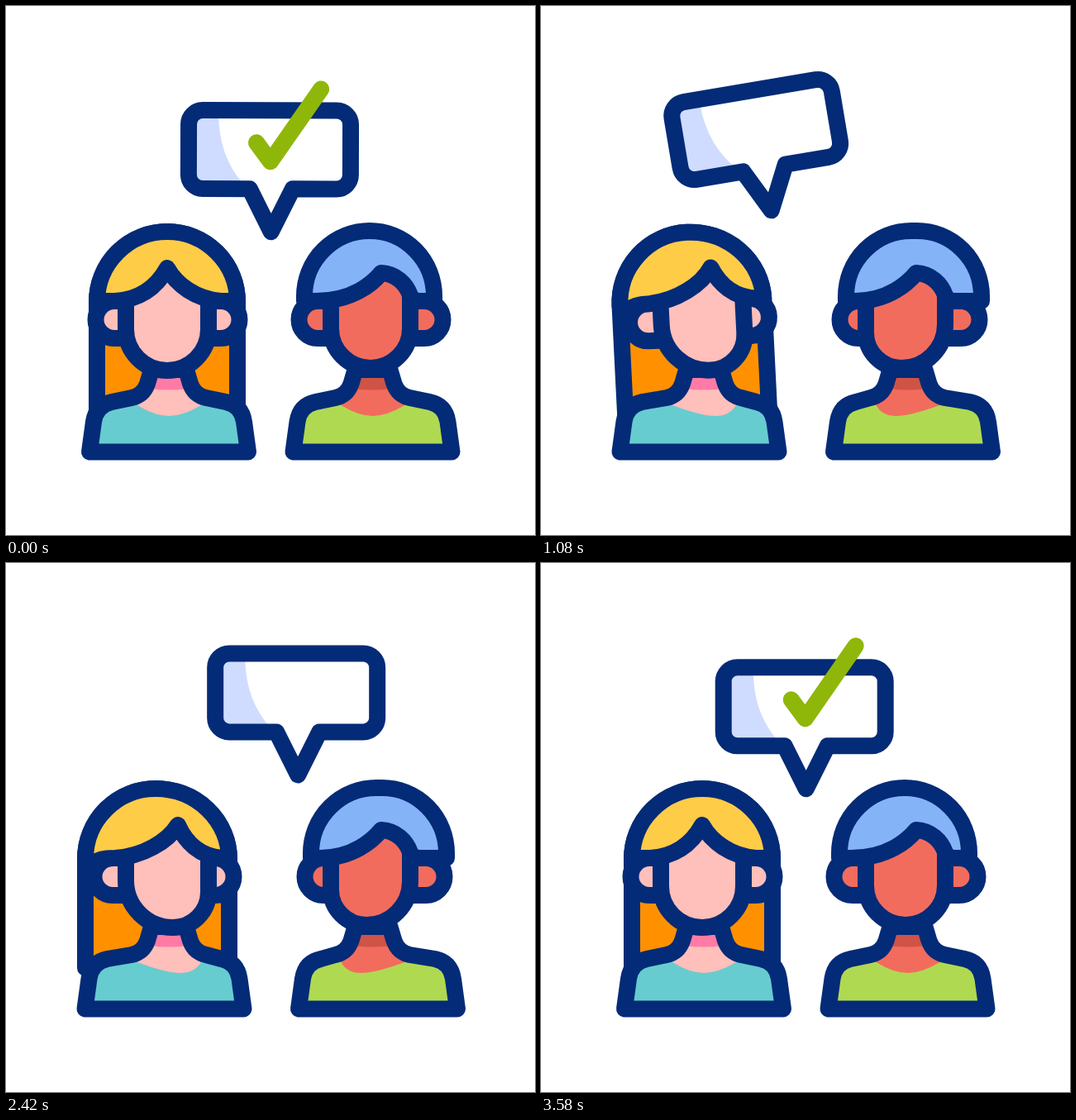
Write an HTML page with a canvas that moves like this. It is 640 by 640 pixels and loops after 3.6 s.

```html
<!DOCTYPE html>
<html lang="en">
<head>
<meta charset="utf-8">
<title>Two people agree</title>
<style>
  html, body { margin: 0; width: 100%; height: 100%; overflow: hidden; background: #fff; }
  canvas { display: block; width: 640px; height: 640px; }
</style>
</head>
<body>
<canvas id="stage" width="640" height="640"></canvas>
<script>
const ctx = document.getElementById('stage').getContext('2d');
const LOOP = 3600, NAVY = '#042b77';

// Eased progress from 0 to 1 between two times
const ease = (t, from, to) => {
  const x = Math.min(1, Math.max(0, (t - from) / (to - from)));
  return (1 - Math.cos(Math.PI * x)) / 2;
};

// Swing with a 400 ms period, active only between two times
const swing = (t, from, to) =>
  t > from && t < to ? Math.sin((t - from) / 400 * 2 * Math.PI) : 0;

function fill(d, color) {
  ctx.fillStyle = color;
  ctx.fill(new Path2D(d));
}

function stroke(d, color = NAVY) {
  ctx.strokeStyle = color;
  ctx.stroke(new Path2D(d));
}

function shape(d, color) {
  fill(d, color);
  stroke(d);
}

function rotated(x, y, degrees, draw) {
  ctx.save();
  ctx.translate(x, y);
  ctx.rotate(degrees * Math.PI / 180);
  ctx.translate(-x, -y);
  draw();
  ctx.restore();
}

// Shoulders and neck; dx places the figure, s moves the torso, collar the neckline
function drawBody(dx, s, collar, shirt, skin, shade) {
  const c = 197 + collar;
  const outline = `M176 440 L171 457 Q166 471 152 474 L${128 + s} 479 Q${109 + s} 483 ${106 + s} 503
    L${101 + s} 539.5 H${293 + s} L${288 + s} 503 Q${285 + s} 483 ${266 + s} 479
    L242 474 Q228 471 223 457 L218 440`;
  ctx.save();
  ctx.translate(dx, 0);
  fill(outline, shirt);
  fill(`M178 440 L174 462 L159 483 Q${c - 17} 496 ${c} 496 Q${c + 17} 496 236 483 L220 462 L216 440Z`, skin);
  fill('M178 440 H216 L220 463 Q197 466 174 463Z', shade);
  stroke(outline + 'Z');
  ctx.restore();
}

function drawEars(left, right, innerLeft, innerRight, skin) {
  shape(`M${innerLeft} 357 H${left} A22.5 22.5 0 0 0 ${left} 402 H${innerLeft}`, skin);
  shape(`M${innerRight} 357 H${right} A22.5 22.5 0 0 1 ${right} 402 H${innerRight}`, skin);
}

function drawFace(left, right, chinX, chinY, peakX, skin) {
  const rl = chinX - left, rr = right - chinX;
  fill(`M${left} 352 L${peakX} 320 L${right} 352Z`, skin);
  shape(`M${left} 350 V${chinY - rl} A${rl} ${rl} 0 0 0 ${chinX} ${chinY}
    A${rr} ${rr} 0 0 0 ${right} ${chinY - rr} V350`, skin);
}

function drawWoman(turn, tilt) {
  const left = 110 - 14 * turn, right = 280 - 10 * turn;
  const top = 195 - 14 * turn, peak = 195 + 13 * turn;
  const dome = `M${left} 358 A${top - left} 85 0 0 1 ${top} 273 A${right - top} 85 0 0 1 ${right} 358`;
  const skin = '#ffbfba';

  rotated(195, 370, tilt, () => shape(`${dome} V490 H${left}Z`, '#ff9100'));
  drawBody(0, -5.5 * turn, 14 * turn, '#67cccf', skin, '#ff7ba6');
  rotated(195, 370, tilt, () => {
    drawEars(131 - 2 * turn, 260 - 7 * turn, 145, 245, skin);
    drawFace(145, 245, 195 + 7 * turn, 441, peak, skin);
    shape(`${dome} V357 H${260 + 2 * turn}
      C${230 + 4 * turn} 355 ${peak + 11 - 2 * turn} 337 ${peak} 317
      C${184 + 12 * turn} 337 165 355 132 357
      C122 357 ${114 - 6 * turn} 357 ${110 - 10 * turn} ${357 + 13 * turn}Z`, '#ffcc47');
  });
}

function drawMan(turn, tilt) {
  const left = 361 + 8 * turn, right = 518 + 15 * turn, skin = '#f26c5d';

  drawBody(246.5, 6.5 * turn, -14 * turn, '#b0d952', skin, '#cf5347');
  rotated(441, 370, tilt, () => {
    drawEars(377 + 7 * turn, 506 + 2 * turn, 393, 489, skin);
    drawFace(393, 489, 441 - 5 * turn, 438, 454, skin);
    shape(`M${left} 357 V351 A79 79 0 0 1 ${left + 79} 272 H${right - 78}
      A78 79 0 0 1 ${right} 351 V357 H500 Q492 357 489 350
      C484 336 472 324 454 323 C444 335 420 357 ${375 + 5 * turn} 357Z`, '#85b3f8');
  });
}

// The bubble is drawn around the tip of its tail
function drawBubble(x, y, angle, check) {
  ctx.save();
  ctx.translate(x, y);
  rotated(0, 0, angle, () => {
    const outline = `M-83 -147 H79 A17 17 0 0 1 96 -130 V-69 A17 17 0 0 1 79 -52 H26 L0 0 L-26 -52
      H-83 A17 17 0 0 1 -100 -69 V-130 A17 17 0 0 1 -83 -147Z`;
    fill(outline, '#fff');
    fill('M-100 -147 H-64 C-64 -110 -55 -82 -33 -57 V-52 H-100Z', '#cfdcff');
    stroke(outline);
    if (check > 0) {
      ctx.setLineDash([136 * check, 400]);
      stroke('M-18 -108 L-1 -85 L60 -173', '#8fb70a');
      ctx.setLineDash([]);
    }
  });
  ctx.restore();
}

function draw(t) {
  ctx.fillStyle = '#fff';
  ctx.fillRect(0, 0, 640, 640);
  ctx.lineWidth = 20;
  ctx.lineCap = ctx.lineJoin = 'round';

  const turn = ease(t, 0, 300) - ease(t, 2500, 2800);
  const toLeft = ease(t, 0, 300), toRight = ease(t, 1200, 1500), back = ease(t, 2300, 2600);
  const angle = 10 * (swing(t, 0, 1200) + swing(t, 1500, 2300) + swing(t, 2600, 3400));
  const check = 1 - ease(t, 280, 390) + ease(t, 2500, 2800);

  drawWoman(turn, 3 * swing(t, 400, 1200));
  drawMan(turn, 3 * swing(t, 1500, 2300));
  drawBubble(320.7 - 42 * toLeft + 92 * toRight - 50 * back, 273.3 - 26 * (toLeft - back), angle, check);
}

const start = performance.now();
function tick() {
  draw((performance.now() - start) % LOOP);
  requestAnimationFrame(tick);
}
tick();
</script>
</body>
</html>
```
